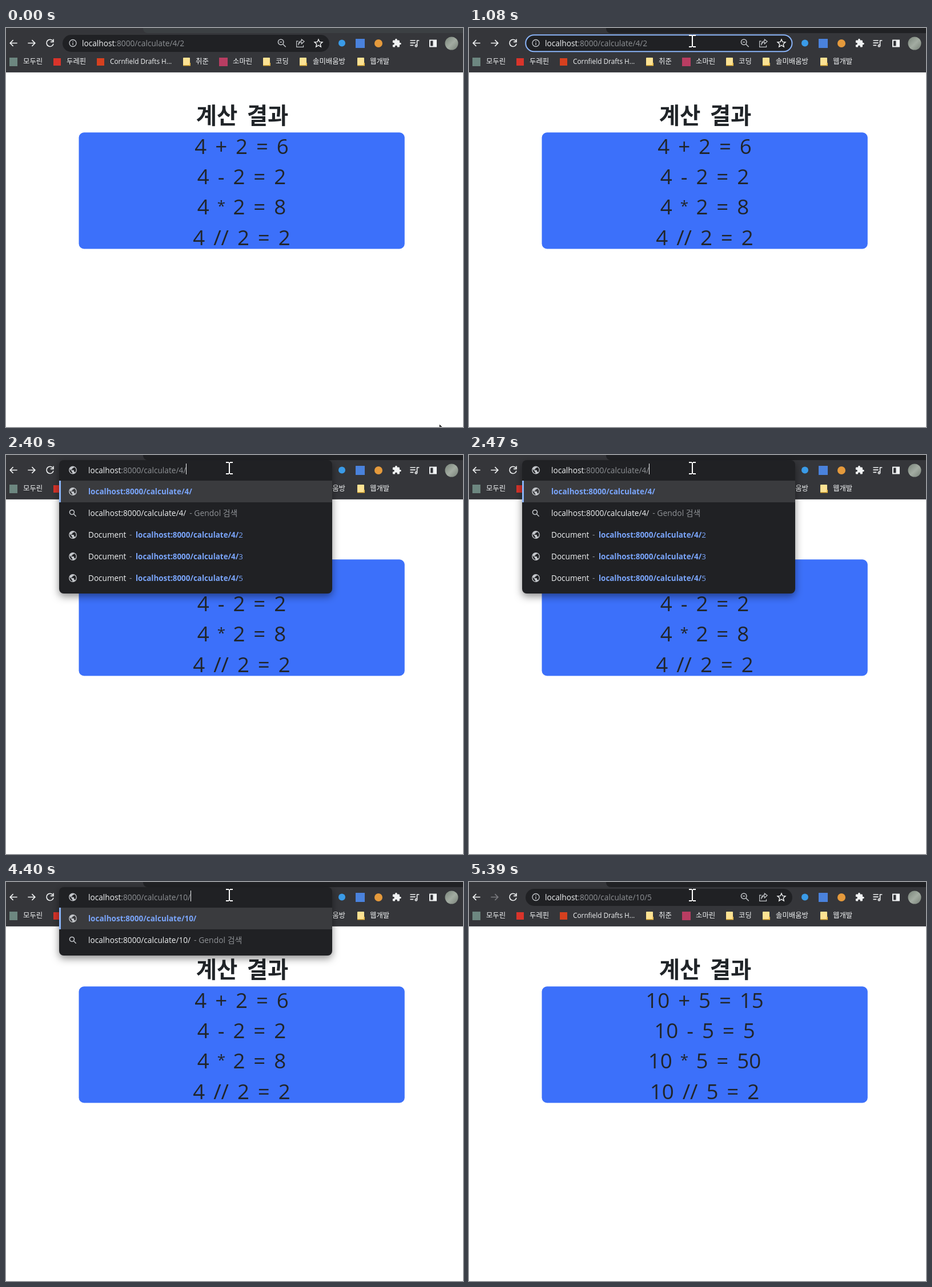
Recreate the animation shown at these times as an HTML page with a canvas. Size 800 by 700 pixels, loop 5.93 s.

```html
<!DOCTYPE html>
<html lang="ko">
<head>
<meta charset="utf-8">
<title>계산 결과</title>
<style>
  html, body { margin: 0; width: 100%; height: 100%; overflow: hidden; background: #fff; }
  canvas { display: block; }
</style>
</head>
<body>
<canvas id="stage" width="800" height="700"></canvas>
<script>
const ctx = document.getElementById('stage').getContext('2d');
const LOOP = 5930;
const FAMILY = '"Open Sans", "Noto Sans CJK KR", "Noto Sans CJK", sans-serif';
const BASE = 'localhost:8000/calculate/';
const COLORS = {
  bar: '#35363a', dark: '#202124', hover: '#3a3b3e', idle: '#3c4043', edge: '#4a4b4f', ink: '#212529',
  text: '#f1f3f4', dim: '#8f9296', icon: '#c4c7cb', link: '#7aa5fa', ring: '#8ab4f8'
};

// Times of the events
const FOCUS = 870, OPEN = 2400, ENTER = 4930, LOADING = 5060, LOADED = 5330, DONE = 5390;
const TYPED = [[OPEN, '4/'], [2740, '4'], [2810, ''], [3610, '1'], [3740, '10'], [4400, '10/'], [4660, '10/5']];
const BLINKS = [870, 1080, 1270, 1470, 1670, 1870, 2070, 2270, 2400,
  3010, 3210, 3410, 3610, 3940, 4200, 4590, 4660, 4860];

// Stroked icons in a 24 unit box
const ICONS = {
  back: 'M20 12H5M11.5 5.5 5 12l6.5 6.5',
  forward: 'M4 12H19M12.5 5.5 19 12l-6.5 6.5',
  reload: 'M18 7.5A7.3 7.3 0 1 0 19.2 13.5M19.2 3.5v6h-6',
  stop: 'M5.5 5.5l13 13M18.5 5.5l-13 13',
  search: 'M15.5 9.8a5.7 5.7 0 1 1-11.4 0 5.7 5.7 0 0 1 11.4 0zM14 14l6 6',
  minus: 'M7.3 9.8h5',
  info: 'M20.5 12a8.5 8.5 0 1 1-17 0 8.5 8.5 0 0 1 17 0zM12 11v6M12 7v2',
  star: 'M12 3l2.7 6.2 6.8.6-5.1 4.5 1.5 6.6L12 17.4l-5.9 3.5 1.5-6.6L2.5 9.8l6.8-.6z',
  share: 'M8 7H4v13h15v-4M8 16c.5-4 3-6.5 7-6.5V13l6-5.500L15 3v3.5C10.5 7 8 11 8 16z',
  music: 'M3 6h11M3 11h11M3 16h7M17.5 17V6H22M17.5 17a2 2 0 1 1-4 0 2 2 0 0 1 4 0z'
};
// Filled icons
const PUZZLE = 'M20.5 11H19V7c0-1.1-.9-2-2-2h-4V3.5a2.5 2.5 0 0 0-5 0V5H4c-1.1 0-2 .9-2 2v3.8h1.5' +
  'a2.7 2.7 0 0 1 0 5.4H2V20c0 1.1.9 2 2 2h3.8v-1.5a2.7 2.7 0 0 1 5.4 0V22H17c1.1 0 2-.9 2-2v-4h1.5a2.5 2.5 0 0 0 0-5z';
const LAND = 'M4 9.5L9 15v1l2 2v2.5C7 20 3.5 16 4 9.5zM18 17.5L16 16h-1v-3l-1-1H8v-2h2l1-1V7h2l2-2v-.5' +
  'C20 6.5 22 13 18 17.5z';
const ARROW = 'M0 0V17L4 13.2 6.6 19.2 9 18.1 6.4 12.3H12z';

function rect(x, y, w, h, color, radius = 0) {
  ctx.fillStyle = color;
  ctx.beginPath();
  ctx.roundRect(x, y, w, h, radius);
  ctx.fill();
}

function disc(x, y, r, color) {
  ctx.fillStyle = color;
  ctx.beginPath();
  ctx.arc(x, y, r, 0, 7);
  ctx.fill();
}

function setFont(size, weight = 400) {
  ctx.font = `${weight} ${size}px ${FAMILY}`;
}

// Draws text and returns the x where it ends
function put(str, x, y, color, size, weight) {
  setFont(size, weight);
  ctx.fillStyle = color;
  ctx.fillText(str, x, y);
  return x + ctx.measureText(str).width;
}

function inBox(x, y, size, draw) {
  ctx.save();
  ctx.translate(x - size / 2, y - size / 2);
  ctx.scale(size / 24, size / 24);
  draw();
  ctx.restore();
}

function icon(name, x, y, size, color = COLORS.text, width = 1.6) {
  inBox(x, y, size, () => {
    ctx.strokeStyle = color;
    ctx.lineWidth = width * 24 / size;
    ctx.stroke(new Path2D(ICONS[name]));
  });
}

function shape(path, x, y, size, color) {
  inBox(x, y, size, () => {
    ctx.fillStyle = color;
    ctx.fill(new Path2D(path));
  });
}

function globe(x, y, back) {
  disc(x, y, 6.9, COLORS.icon);
  shape(LAND, x, y, 16.5, back);
}

function folder(x) {
  rect(x - 6, 52, 12, 14, '#fde293', 1);
  rect(x - 6, 65, 13, 1.5, '#d9a935');
  rect(x + 5, 61, 2, 5, '#e6b94a');
}

function drawTabs(t) {
  rect(0, 0, 800, 77, COLORS.bar);
  rect(0, 77, 800, 1, COLORS.edge);
  rect(240, 0, 560, 9, t < FOCUS ? COLORS.idle : COLORS.dark, [0, 0, 0, 8]);
}

function drawToolbar(t) {
  icon('back', 13, 26.5, 20);
  icon('forward', 45, 26.5, 20, t < LOADED ? COLORS.text : '#7b7c80');
  icon(t >= LOADING && t < DONE ? 'stop' : 'reload', 77, 26.5, 20);

  disc(588, 26.5, 6, '#3a9be8');
  rect(612, 19, 16, 16, '#4a82dc');
  disc(652, 27, 7, '#e59a3c');
  shape(PUZZLE, 684, 26.5, 17, COLORS.text);
  icon('music', 715, 27, 20);
  ctx.strokeStyle = COLORS.text;
  ctx.lineWidth = 2;
  ctx.strokeRect(742, 21.5, 11, 11);
  rect(747.5, 21, 6, 12, COLORS.text);
  const photo = ctx.createLinearGradient(770, 18, 790, 38);
  photo.addColorStop(0, '#7f8a80');
  photo.addColorStop(0.5, '#a3aca2');
  photo.addColorStop(1, '#7b857b');
  disc(780, 27, 11.5, photo);
}

function drawBookmarks() {
  rect(6, 52, 14, 15, '#6d8780');
  rect(83, 53, 13, 13, '#d9342b');
  rect(159, 53, 13, 13, '#d6401f');
  rect(373, 52, 15, 15, '#b83d62');
  [316, 456, 520, 621].forEach(folder);
  const labels = [[30, '모두린'], [106, '두레핀'], [182, 'Cornfield Drafts H...'], [332, '취준'],
    [397, '소마린'], [472, '코딩'], [537, '솔미배움방'], [637, '웹개발']];
  for (const [x, label] of labels) put(label, x, 63, COLORS.text, x === 182 ? 11.8 : 12.4);
}

function drawUrl(path, x) {
  const end = put('localhost', x, 31.5, COLORS.text, 13.7);
  return put(BASE.slice(9) + path, end, 31.5, COLORS.dim, 13.7);
}

function drawCaret(t, x) {
  const on = BLINKS.filter(b => b <= t).length % 2;
  if (on) rect(Math.round(x), 15, 1, 19, COLORS.text);
}

function drawOmnibox(t) {
  rect(99, 12, 467, 30, COLORS.dark, 15);
  icon('info', 117, 26.5, 17, COLORS.icon, 1.3);
  icon('search', 483, 26.5, 20, COLORS.icon, 1.5);
  icon('minus', 483, 26.5, 20, COLORS.icon, 1.3);
  icon('share', 515, 27, 19, COLORS.icon, 1.2);
  icon('star', 547, 26.5, 17.5, COLORS.text, 1.4);
  const end = drawUrl(t < ENTER ? '4/2' : '10/5', 133);
  if (t >= FOCUS && t < OPEN) {
    ctx.strokeStyle = COLORS.ring;
    ctx.lineWidth = 2;
    ctx.beginPath();
    ctx.roundRect(99.2, 12.2, 466.3, 29, 14.5);
    ctx.stroke();
    drawCaret(t, end);
  }
}

function drawDropdown(t) {
  const path = TYPED.filter(([at]) => at <= t).pop()[1];
  const url = BASE + path;
  const history = ['4/2', '4/3', '4/5'].filter(p => p.startsWith(path));

  ctx.save();
  ctx.shadowColor = 'rgba(0,0,0,0.45)';
  ctx.shadowBlur = 14;
  ctx.shadowOffsetY = 5;
  rect(93, 9, 478, 120 + history.length * 38, COLORS.dark, 8);
  ctx.restore();

  globe(117, 26.5, COLORS.dark);
  drawCaret(t, drawUrl(path, 144));

  rect(93, 45, 478, 38, COLORS.hover);
  rect(93, 45, 3, 38, COLORS.ring);
  globe(117, 64, COLORS.hover);
  put(url, 144, 69, COLORS.link, 13.5, 700);

  icon('search', 117, 102, 17, COLORS.icon, 1.5);
  const end = put(url, 144, 107, COLORS.text, 13.7);
  put('- Gendol 검색', end + 6, 107, COLORS.dim, 13.9);

  history.forEach((entry, i) => {
    const y = 140 + 38 * i;
    globe(117, y, COLORS.dark);
    put('Document', 144, y + 5, COLORS.text, 13.6);
    put('-', 216, y + 5, COLORS.dim, 13.6);
    const x = put(url, 227, y + 5, COLORS.link, 13.4, 700);
    put(entry.slice(path.length), x, y + 5, COLORS.link, 13.4);
  });
}

// One centred line of spaced tokens; the asterisk is small and narrow
function drawSum(line, y) {
  const tokens = line.split(' ');
  const gap = 14.9;
  setFont(36.7);
  const widths = tokens.map(k => ctx.measureText(k === '*' ? '-' : k).width);
  let x = 412.5 - (widths.reduce((a, b) => a + b) + gap * (tokens.length - 1)) / 2;
  tokens.forEach((token, i) => {
    if (token === '*') put(token, x - 1, y - 6, COLORS.ink, 26);
    else put(token, x, y, COLORS.ink, 36.7);
    x += widths[i] + gap;
  });
}

function drawPage(t) {
  rect(0, 78, 800, 622, '#fff');
  ctx.textAlign = 'center';
  ctx.wordSpacing = '6px';
  put('계산 결과', 413.5, 167.5, COLORS.ink, 39.5, 700);
  ctx.wordSpacing = '0px';
  ctx.textAlign = 'left';

  rect(127.5, 183.3, 570.3, 204.2, '#3c70fa', 9);
  const [a, b] = t < LOADED ? [4, 2] : [10, 5];
  const sums = [`${a} + ${b} = ${a + b}`, `${a} - ${b} = ${a - b}`,
    `${a} * ${b} = ${a * b}`, `${a} // ${b} = ${Math.floor(a / b)}`];
  sums.forEach((line, i) => drawSum(line, 220.7 + 53.3 * i));
}

function drawArrow(x, y) {
  ctx.save();
  ctx.translate(x, y);
  ctx.scale(1.25, 1.25);
  const path = new Path2D(ARROW);
  ctx.fillStyle = '#fff';
  ctx.strokeStyle = '#000';
  ctx.lineWidth = 1;
  ctx.fill(path);
  ctx.stroke(path);
  ctx.restore();
}

function drawBeam(x, y) {
  rect(x - 1, y - 10, 2, 20, '#fff');
  for (const edge of [-11, 9]) {
    rect(x - 6, y + edge, 5, 2, '#fff');
    rect(x + 1, y + edge, 5, 2, '#fff');
  }
}

function drawCursor(t) {
  if (t >= 740) return drawBeam(391, 23);
  if (t >= 670) return drawBeam(384, 32);
  const step = t < 70 ? 0 : Math.min(9, 1 + Math.floor((t - 70) / 66.25));
  const p = step / 9;
  const e = p * p * (3 - 2 * p);
  drawArrow(759.5 - 386 * e, 697 - 655 * e);
}

function draw() {
  const t = performance.now() % LOOP;
  drawPage(t);
  drawTabs(t);
  drawToolbar(t);
  drawBookmarks();
  if (t >= OPEN && t < ENTER) drawDropdown(t);
  else drawOmnibox(t);
  drawCursor(t);
  requestAnimationFrame(draw);
}
draw();
</script>
</body>
</html>
```
